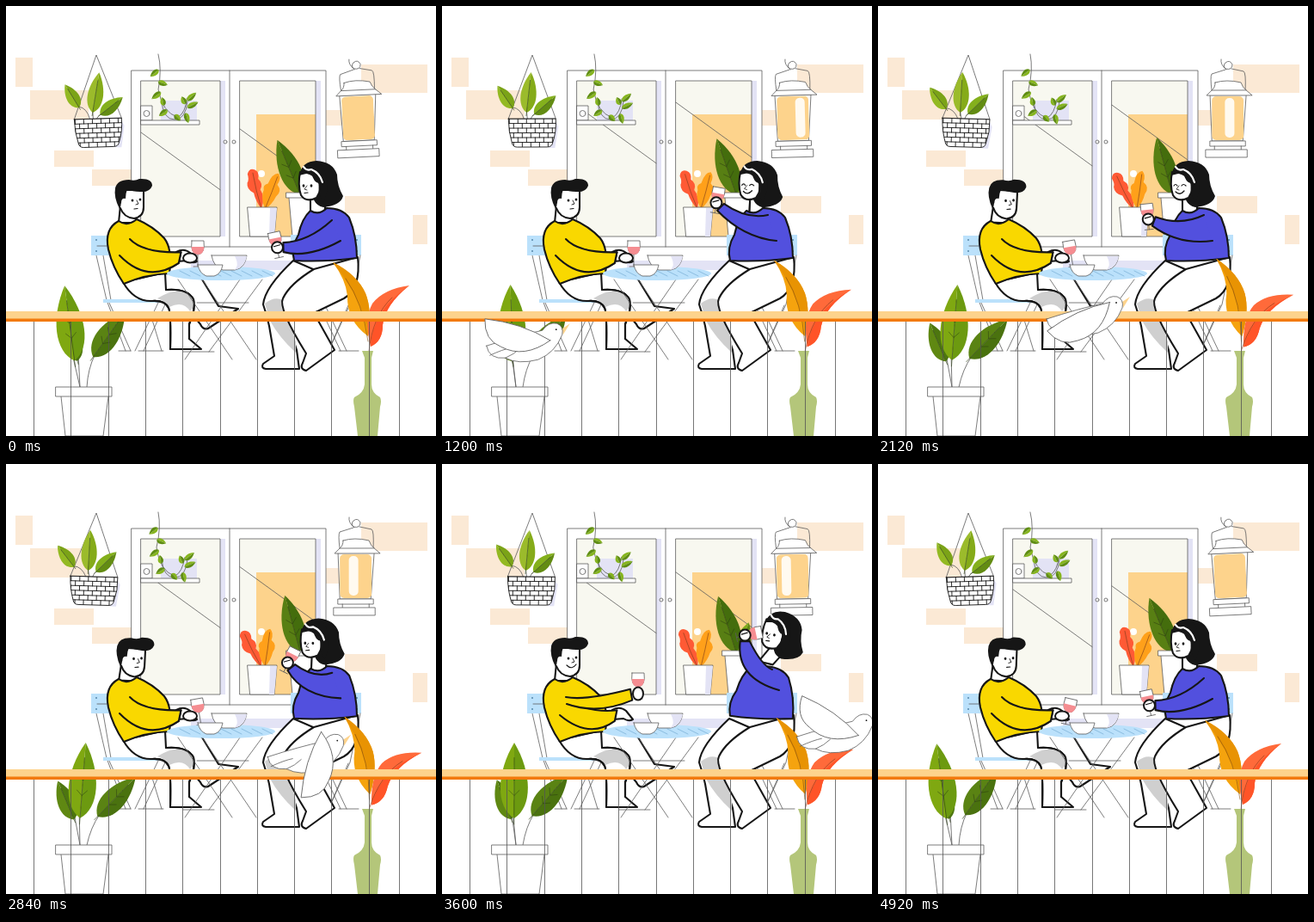
Write an HTML page with a canvas that moves like this. It is 500 px wide and 500 px high and loops after 5000 ms.

```html
<!DOCTYPE html>
<html lang="en">
<head>
<meta charset="utf-8">
<title>Balcony</title>
<style>
html, body { margin: 0; width: 100%; height: 100%; overflow: hidden; background: #fff; }
canvas { display: block; width: 500px; height: 500px; }
</style>
</head>
<body>
<canvas id="stage" width="500" height="500"></canvas>
<script>
const ctx = document.getElementById('stage').getContext('2d');
const LOOP = 5000, INK = '#161616', THIN = '#5c5c5c', LILAC = '#e3e3f5', BLUE = '#bbe1fb';
const YELLOW = '#f9d800', INDIGO = '#5250de', AMBER = '#fdd38c';

// Timing: ramp goes 0 to 1 between two times, pulse rises and falls again.
function ramp(t, from, to) {
  const p = Math.min(1, Math.max(0, (t - from) / (to - from)));
  return p * p * (3 - 2 * p);
}
const pulse = (t, a, b, c, d) => ramp(t, a, b) - ramp(t, c, d);
const mix = (a, b, p) => a + (b - a) * p;

function shape(d, fill, stroke, width = 0.8) {
  const path = new Path2D(d);
  if (fill) { ctx.fillStyle = fill; ctx.fill(path); }
  if (stroke) { ctx.strokeStyle = stroke; ctx.lineWidth = width; ctx.stroke(path); }
}
const bold = (d, fill) => shape(d, fill, INK, 2.1);
const thin = (d, fill) => shape(d, fill, THIN, 0.8);

function rect(x, y, w, h, fill, stroke) {
  shape(`M${x} ${y}h${w}v${h}h${-w}z`, fill, stroke);
}
function oval(x, y, rx, ry, fill, stroke, width = 0.8) {
  ctx.beginPath();
  ctx.ellipse(x, y, rx, ry, 0, 0, Math.PI * 2);
  if (fill) { ctx.fillStyle = fill; ctx.fill(); }
  if (stroke) { ctx.strokeStyle = stroke; ctx.lineWidth = width; ctx.stroke(); }
}
function moved(x, y, degrees, draw) {
  ctx.save();
  ctx.translate(x, y);
  ctx.rotate(degrees * Math.PI / 180);
  draw();
  ctx.restore();
}
function around(x, y, degrees, draw) {
  moved(x, y, degrees, () => { ctx.translate(-x, -y); draw(); });
}

// A two-toned leaf from base to tip with a midrib and veins.
function leaf(bx, by, tx, ty, w, light, dark, vein = '#2c3f12') {
  const len = Math.hypot(tx - bx, ty - by);
  moved(bx, by, Math.atan2(ty - by, tx - bx) * 180 / Math.PI, () => {
    const half = s => `M0 0C${len * 0.15} ${s * w * 0.72} ${len * 0.6} ${s * w * 0.7} ${len} 0z`;
    shape(half(-1), light);
    shape(half(1), dark);
    if (!vein) return;
    shape(`M${-len * 0.08} 0H${len * 0.8}`, null, vein, 0.6);
    if (len > 60) for (let x = len * 0.3; x < len * 0.7; x += len * 0.2) {
      shape(`M${x + 6} -6L${x} 0L${x + 6} 6`, null, vein, 0.5);
    }
  });
}

function glass(x, y, tilt) {
  moved(x, y, tilt, () => {
    thin('M0 8V22M-5 22H5');
    thin('M-7 -8H7Q9 7 0 8Q-9 7 -7 -8z', '#fff');
    shape('M-7.4 -1H7.4Q7 8 0 8Q-7 8 -7.4 -1z', '#f58d91');
  });
}

// A sleeve from the shoulder to a cuff that faces away from the elbow.
function sleeve(top, pit, elbow, hand, cuff, sagTop, sagPit, fill) {
  const a = Math.atan2(hand.y - elbow.y, hand.x - elbow.x);
  const wrist = { x: hand.x - 7 * Math.cos(a), y: hand.y - 7 * Math.sin(a) };
  const nx = Math.abs(cuff) * -Math.sin(a), ny = Math.abs(cuff) * Math.cos(a), s = Math.sign(cuff);
  const up = { x: wrist.x + s * nx, y: wrist.y + s * ny };
  const low = { x: wrist.x - s * nx, y: wrist.y - s * ny };
  const curve = (p, q, sag) => `${(p.x + q.x) / 2 + sag.x} ${(p.y + q.y) / 2 + sag.y} ${q.x} ${q.y}`;
  bold(`M${top.x} ${top.y}Q${curve(top, up, sagTop)}L${low.x} ${low.y}Q${curve(low, pit, sagPit)}`, fill);
}

function bricks() {
  for (const b of [[11, 60, 20, 34], [28, 98, 68, 34], [56, 168, 46, 19], [100, 190, 46, 19],
    [413, 68, 77, 33], [371, 121, 22, 18], [394, 221, 47, 20], [473, 243, 17, 34]]) rect(...b, '#fbe9d5');
}

function windowFrame(t, sway) {
  const back = Math.max(0, (t - 1000) / 4000);
  const sun = -31 * ramp(t, 0, 1000) * (1 - back ** 1.8);
  rect(215, 296, 125, 11, LILAC);
  rect(146, 75, 226, 205, '#fff', THIN);
  thin('M260 75V280');
  for (const [x, w, y] of [[157, 92, 147], [272, 88, 143]]) {
    rect(x + w, 87, 6, 181, LILAC);
    rect(x, 87, w, 181, '#f8f8f0');
    if (x > 200) {
      rect(291, 126, 69, 142, AMBER);
      oval(297, 195, 4, 4, '#fff');
    }
    thin(`M${x} ${y + sun}L${x + w} ${y + sun + w * 0.725}`);
    rect(x, 87, w, 181, null, THIN);
  }
  oval(255, 158, 2, 2, '#fff', THIN);
  oval(265, 158, 2, 2, '#fff', THIN);
  rect(180, 110, 42, 23, LILAC);
  thin('M181 111Q183 132 196 132Q209 132 211 111');
  rect(157, 116, 13, 17, '#fff', THIN);
  oval(163.5, 125, 3.5, 3.5, '#fff', THIN);
  rect(157, 133, 68, 5, '#fff', THIN);
  ivy(sway);
  sillPlants(sway);
}

function ivy(sway) {
  const sprig = (...p) => leaf(...p, 6, '#86b51e', '#5f8d13', null);
  around(177, 56, -1.5 * sway, () => {
    thin('M177 56Q181 74 176 97Q180 124 198 130Q207 125 209 108');
    sprig(177, 74, 167, 82); sprig(176, 88, 187, 92); sprig(179, 100, 168, 108);
    sprig(182, 116, 180, 106); sprig(186, 121, 176, 128); sprig(194, 127, 201, 134);
    sprig(207, 115, 203, 106); sprig(209, 111, 220, 102); sprig(209, 119, 222, 113); sprig(207, 125, 210, 137);
  });
}

function sillPlants(sway) {
  around(299, 236, 7 * sway, () => {
    shape('M297 236Q289 228 286 219Q277 216 277 208Q279 204 276 198Q277 190 284 192Q290 194 289 202Q296 207 293 214Q300 222 297 236z', '#ff5a35');
    shape('M301 236Q294 222 297 214Q295 208 301 206Q305 193 312 193Q316 198 312 206Q319 213 312 220Q309 229 301 236z', '#ffa01a');
    shape('M297 236Q288 216 282 196M301 236Q307 215 311 197', null, '#7b3b1a', 0.6);
  });
  thin('M281 234H315L312 268H284z', '#fff');
  shape('M307 235H315L312 268H306z', LILAC);
  around(343, 220, -4 * sway, () => {
    leaf(346, 220, 356, 184, 16, '#80ad1d', '#5f8814');
    leaf(342, 219, 320, 154, 24, '#587f13', '#446d0d');
  });
  thin('M329 223L333 268H354L358 223', '#fff');
  rect(326, 217, 34, 6, '#fff', THIN);
}

function basket(sway) {
  around(105, 57, -1.8 * sway, () => {
    shape('M131 132L135 140L131 165L124 165z', LILAC);
    thin('M77 131L105 57L132 131');
    around(100, 131, 5 * sway, () => {
      thin('M95 131Q91 119 82 118M99 131Q98 124 98 118M103 131Q106 124 112 124');
      leaf(82, 119, 64, 93, 14, '#93b922', '#7ba317');
      leaf(98, 124, 103, 77, 17, '#9bbb2b', '#85ab19');
      leaf(107, 126, 132, 104, 14, '#84b01c', '#638c13');
    });
    ctx.save();
    const body = 'M77 131H132Q133 146 128 160Q127 164 122 164H87Q82 164 81 159Q77 146 77 131z';
    shape(body, '#fff');
    ctx.clip(new Path2D(body));
    for (let row = 0; row < 6; row++) {
      const y = 131 + row * 5.5;
      shape(`M76 ${y}H134`, null, INK, 0.9);
      for (let x = 78 + row % 2 * 5; x < 134; x += 10) shape(`M${x} ${y}v5.5`, null, INK, 0.9);
    }
    ctx.restore();
    shape(body, null, INK, 0.9);
  });
}

function lantern(t, sway) {
  const shine = 417 - t * 0.0065;
  around(402, 66, -1.35 * (1 + sway), () => {
    thin('M399 62Q398 68 404 73Q412 75 412 68Q409 62 404 66Q400 70 405 74M411 73L425 76Q428 77 427 98M404 74L388 79Q386 82 388 98');
    thin('M386 104L388 157H424L428 104z', '#fff');
    ctx.save();
    ctx.beginPath();
    ctx.roundRect(388, 105, 37, 51, 5);
    ctx.clip();
    rect(388, 105, 37, 51, AMBER);
    if (shine < 415 && shine > 390) {
      ctx.beginPath();
      ctx.roundRect(shine, 107, 11, 46, 5);
      ctx.fillStyle = '#fffaf0';
      ctx.fill();
    }
    ctx.restore();
    thin('M392 89Q405 85 422 89Q424 95 428 98L435 104H382L388 98Q392 95 392 89zM388 98H428', '#fff');
    rect(386, 157, 41, 6, '#fff', THIN);
    thin('M391 163V167M422 163V167');
    rect(381, 167, 48, 9, '#fff', THIN);
  });
}

function chairs() {
  thin('M105 290L117 342L139 401M113 290L122 342M120 345L145 401M186 345L160 401M177 345L150 401M131 401H145M154 401H183M170 365L181 401');
  rect(99, 267, 24, 23, BLUE);
  rect(113, 341, 77, 4, BLUE);
  thin('M106 279H117');
  rect(331, 266, 82, 24, BLUE);
  for (const x of [105, 408]) for (const y of [272, 285]) oval(x, y, 1, 1, '#5686aa');
  thin('M412 290L400 347L375 401M398 348L375 401M372 350L396 401M365 350L389 401M370 401H380M387 401H410');
}

function table() {
  thin('M272 318L208 411M228 318L291 411M298 318L236 402M200 318L263 411M206 402H242M222 345H282');
  oval(250, 311, 63, 8, BLUE);
  for (let x = 202; x < 300; x += 12) shape(`M${x} 308l12 6`, null, '#78aed5', 0.7);
  thin('M239 290H280Q278 305 266 307H252Q241 303 239 290z', '#fff');
  shape('M266 291H280Q277 305 265 307Q272 302 266 291z', LILAC);
  thin('M223 301H252Q250 312 242 314H233Q225 311 223 301z', '#fff');
}

function man(t) {
  const toast = pulse(t, 2900, 3450, 4250, 4750);
  const nod = pulse(t, 1400, 2000, 2900, 3400) + pulse(t, 4500, 4900, 4920, 5000) * 0.7;
  const swirl = pulse(t, 4550, 4880, 4920, 5000);
  const elbow = { x: 165, y: mix(285, 278, toast) };
  const hand = { x: mix(209, 227, toast), y: mix(294, 267, toast) };

  bold('M190 312Q220 309 228 318L247 349L270 352L235 375Q229 377 226 370L213 354', '#fff');
  bold('M136 321Q149 344 170 343Q185 342 189 351Q192 356 191 399H227L213 387V370Q221 352 218 341Q211 328 186 330L185 310z', '#fff');
  shape('M176 340Q195 328 211 333Q220 340 218 350L214 355Q206 342 190 350Q184 342 176 340z', '#cfcfcf');
  bold('M170 343Q185 342 189 351Q192 356 191 399M213 387V370Q221 352 218 341Q211 328 186 330');
  around(140, 255, nod * 3, () => {
    bold('M133 232L131 252H152L150 243', '#fff');
    bold('M135 214H160V234Q160 245 149 247Q137 246 133 235', '#fff');
    shape('M132 236Q125 222 127 212Q129 202 143 202Q150 204 155 201Q170 200 170 209Q167 217 156 216Q147 216 141 213Q139 218 139 224Q134 223 134 229z', INK);
    oval(147, 226, 1.4, 1.6, INK);
    oval(156, 225, 1.4, 1.6, INK);
    shape('M152 226L154 230L151 231', null, INK, 0.9);
    shape(toast > 0.5 ? 'M145 234Q151 240 156 233' : 'M149 236L153 235.5', null, INK, 1.2);
  });
  bold('M131 250Q141 257 152 248Q171 256 184 270Q194 283 190 311Q162 312 137 323Q124 304 119 283Q114 259 131 250z', YELLOW);
  bold('M198 286Q207 281 214 287L222 297Q217 300 211 296L199 297', '#fff');
  sleeve({ x: 165, y: 283 }, { x: 137, y: 292 }, { x: 165, y: 285 }, { x: 209, y: 294 }, -6.5,
    { x: 0, y: 4 }, { x: 2, y: 25 }, YELLOW);
  glass(mix(223, 228, toast), mix(281, 251, toast), 20 * swirl - 10 * nod);
  oval(mix(214, 228, toast), mix(293, 267, toast), mix(8, 6, toast), mix(5.5, 7.5, toast), '#fff', INK, 2);
  sleeve({ x: 144, y: 271 }, { x: mix(132, 145, toast), y: mix(290, 279, toast) }, elbow, hand, -6.5,
    { x: -14, y: 9 }, { x: -2, y: mix(29, 15, toast) }, YELLOW);
}

function woman(t) {
  const lift = pulse(t, 100, 1000, 3800, 4400);
  const cheer = pulse(t, 500, 1100, 1300, 2100);
  const sip = pulse(t, 2500, 3300, 3700, 4150);
  const tip = sip ** 3;
  const smiling = t > 700 && t < 2500;
  const cup = { x: 313 + 8 * cheer + 51 * sip, y: 271 - 33 * lift - 19 * cheer - 41 * sip };
  const tilt = -12 + 6 * lift + 16 * cheer + 84 * sip;
  const a = tilt * Math.PI / 180;
  const hand = { x: cup.x - 12 * Math.sin(a), y: cup.y + 10 * Math.cos(a) };
  const withHead = draw => moved(4 * cheer + 27 * tip, -9 * tip, 0, () => around(362, 228, 2 * cheer + 13 * tip, draw));

  bold('M334 296Q301 327 299 347Q303 358 306 372L312 407L299 416Q296 421 302 422H341L338 400L322 350L357 306z', '#fff');
  shape('M301 346Q312 337 322 342L337 391L337 403Q318 386 307 366z', '#cfcfcf');
  bold('M409 292Q413 328 393 340L358 357L382 400L349 424Q341 422 345 415L349 404Q316 351 322 340Q330 323 358 306z', '#fff');
  withHead(() => bold(`M354 223L${354 - 10 * tip} 243H${371 - 10 * tip}L371 225`, '#fff'));
  around(372, 293, 5 * tip, () => {
    bold('M354 238Q364 244 373 235Q391 235 399 246Q408 268 408 293Q370 298 335 296Q331 281 340 266Q344 247 354 238z', INDIGO);
  });
  withHead(() => {
    shape('M342 195Q344 181 361 180Q380 181 385 196Q385 209 392 221Q389 232 369 234Q354 231 356 208z', INK);
    bold('M342 193Q339 208 343 220Q349 229 361 223Q369 211 362 202Q356 193 342 193z', '#fff');
    shape('M341 197Q344 183 361 181Q374 187 374 213L369 228Q362 218 364 206Q358 206 355 194Q348 195 341 197z', INK);
    shape('M346 187Q349 192 355 190Q365 194 368 205', null, '#fff', 2.2);
    if (smiling) {
      shape('M344 209Q346 206 348 209M353 209Q355 206 358 209', null, INK, 1.2);
      shape('M346 216Q351 221 356 215', null, INK, 1.3);
    } else {
      oval(346, 209, 1.4, 1.7, INK);
      oval(355, 209, 1.4, 1.7, INK);
      shape('M347 217.5L351 217', null, INK, 1.2);
    }
    shape('M350 209L347 213L350 214', null, INK, 0.8);
  });
  glass(cup.x, cup.y, tilt);
  oval(hand.x, hand.y, 6.5, 6.5, '#fff', INK, 2);
  shape(`M${hand.x - 4} ${hand.y - 1}l7 -2`, null, INK, 1.2);
  sleeve({ x: 379 + 5 * tip, y: 249 - 6 * lift - 4 * tip }, { x: 389 + 3 * tip, y: 273 - 10 * tip },
    { x: 352, y: 280 - 18 * lift }, hand, 5.5, { x: 1, y: 12 }, { x: -4 - 24 * sip, y: 14 }, INDIGO);
}

function pottedPlant(sway) {
  around(86, 443, 4 * sway, () => {
    thin('M86 443L82 410');
    leaf(81, 413, 65, 367, 20, '#5f8812', '#4d760f');
  });
  around(92, 443, -4.5 * sway, () => {
    thin('M94 443Q97 422 106 407');
    leaf(104, 409, 145, 360, 24, '#5a8313', '#4a720f');
  });
  around(86, 443, -6.2 * sway, () => {
    thin('M86 443L82 410');
    leaf(83, 412, 81, 324, 30, '#7fa811', '#6c9a10');
  });
  thin('M64 454L69 500H113L119 454', '#fff');
  rect(58, 443, 65, 11, '#fff', THIN);
}

function vase(sway) {
  const swing = 1 - sway;
  around(421, 402, 3.8 * swing, () => {
    shape('M380 298Q408 312 418 334Q426 354 421 384Q396 366 397 337Q395 318 380 298z', '#f5a30e');
    shape('M380 298Q408 312 418 334Q426 354 421 384Q417 345 380 298z', '#e89303');
    shape('M421 390Q415 345 395 317', null, '#7f4b10', 0.6);
  });
  around(422, 402, 6 * swing, () => {
    shape('M469 325Q439 329 426 346Q416 364 424 396Q438 390 438 371Q441 347 469 325z', '#ff6a3a');
    shape('M469 325Q441 347 438 371Q438 390 424 396Q426 354 469 325z', '#ff5428');
    shape('M422 402Q426 360 449 339', null, '#8b3518', 0.6);
  });
  shape('M414 401H427L425 409V440Q425 450 435 455Q437 459 435 466L432 500H409L405 466Q403 458 405 455Q416 450 417 440V409z', '#b4c67a');
}

function railing() {
  for (let i = 0; i < 10; i++) shape(`M${Math.round(32 + i * 43.3)}.5 366V500`, null, '#555', 0.8);
  shape('M457.5 366V500', null, '#555', 0.8);
  rect(0, 355, 500, 9, AMBER);
  rect(0, 363.5, 500, 3.5, '#f27a0c');
}

function bird(t) {
  const flap = Math.cos((t - 1310) / 1090 * Math.PI * 2);
  moved(-75.6 + t * 0.1503, 428.9 - t * 0.0325, 0, () => {
    shape('M41 -16L50 -22L42 -9z', AMBER);
    thin('M-47 4Q-10 -8 18 -14Q25 -24 35 -22Q43 -19 41 -9Q33 12 13 20Q-10 26 -25 18Q-44 20 -47 4z', '#fff');
    thin('M-43 15Q-28 8 -18 6M-25 18Q-15 14 -8 7');
    oval(34, -15, 0.9, 0.9, INK);
    moved(10, -8, 158 + 62 * flap, () => {
      thin('M-18 0Q20 9 62 0Q55 -24 34 -25Q4 -30 -18 0z', '#fff');
    });
  });
}

function draw(t) {
  const sway = Math.cos(t / LOOP * Math.PI * 2);
  ctx.fillStyle = '#fff';
  ctx.fillRect(0, 0, 500, 500);
  bricks();
  windowFrame(t, sway);
  basket(sway);
  lantern(t, sway);
  chairs();
  man(t);
  table();
  woman(t);
  pottedPlant(sway);
  vase(sway);
  railing();
  bird(t);
}

ctx.lineJoin = ctx.lineCap = 'round';
const start = performance.now();
function tick() {
  const t = (performance.now() - start) % LOOP;
  draw(t < 120 ? 0 : 120 + Math.floor((t - 120) / 80) * 80);
  requestAnimationFrame(tick);
}
tick();
</script>
</body>
</html>
```
